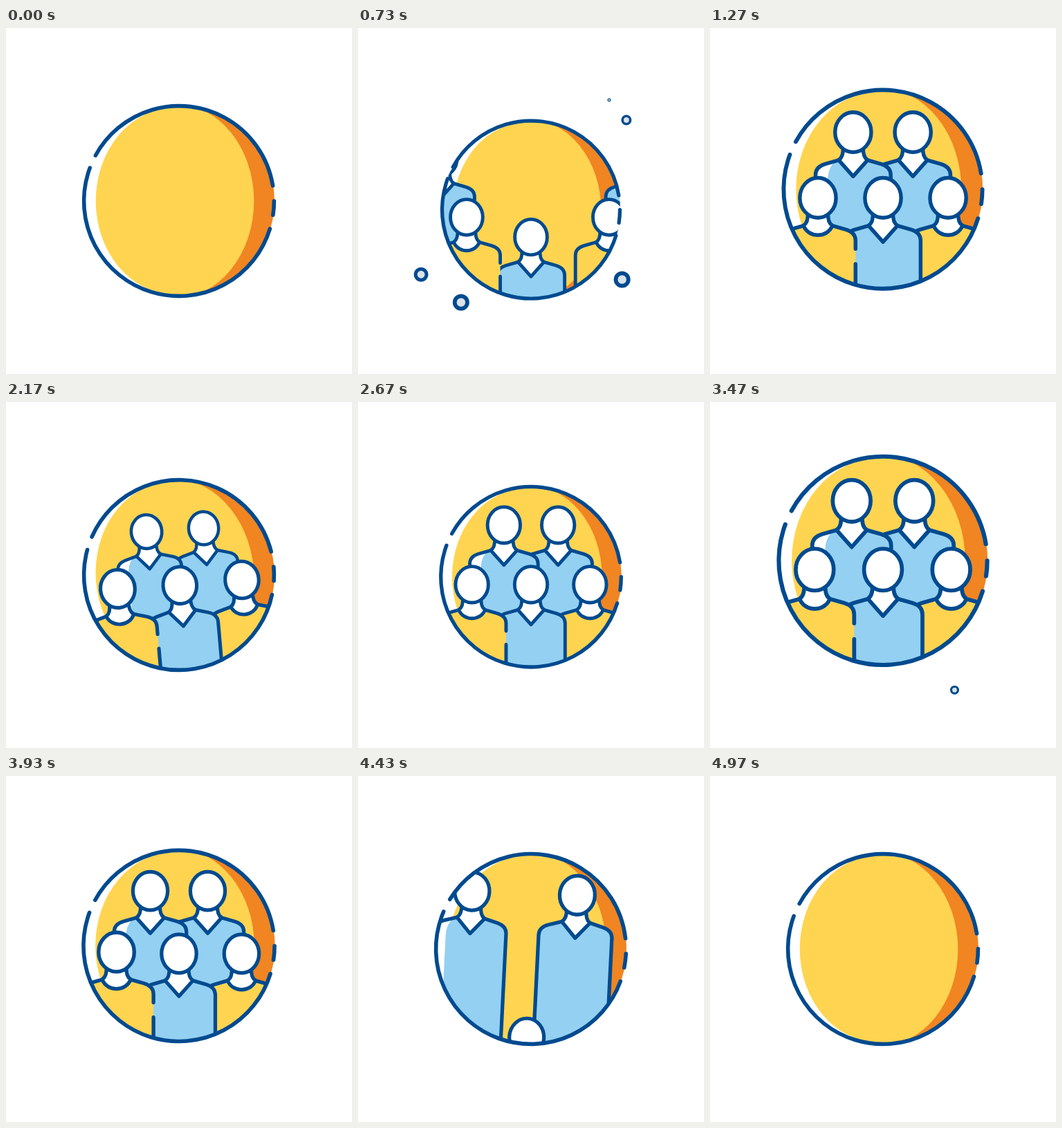
Recreate the animation shown at these times as an HTML page with a canvas. Size 500 by 500 pixels, loop 5.01 s.

```html
<!DOCTYPE html>
<html lang="en">
<head>
<meta charset="utf-8">
<title>Team</title>
<style>
html, body { margin: 0; width: 100%; height: 100%; overflow: hidden; background: #fff; }
canvas { display: block; width: 500px; height: 500px; }
</style>
</head>
<body>
<canvas id="stage" width="500" height="500"></canvas>
<script>
const ctx = document.getElementById('stage').getContext('2d');
const LOOP = 5010, FPS = 30, LAST = 149, HALF = 75, RAD = Math.PI / 180;
const NAVY = '#004a8f', YELLOW = '#ffd450', ORANGE = '#f08522', BLUE = '#93d0f2', PALE = '#dbe2ea';
const FOOT = 110;   // squash pivot below each head
const FAR = 157;    // entry distance

function ease(x) {
  x = Math.max(0, Math.min(1, x));
  return x * x * (3 - 2 * x);
}

// Eased run through equally spaced values
function run(f, start, step, values) {
  return values.reduce((v, next, i) =>
    i ? v + (next - values[i - 1]) * ease((f - start) / step - i + 1) : next, 0);
}

function person(side, back) {
  const blue = back || !side;
  return {
    x: side * (back ? 41.3 : 90),
    y: back ? -79 : 11.7,
    dx: side,
    dy: side ? 0 : 1,
    delay: (back ? 6.5 : 0) + (side < 0 ? 0 : 2),
    fill: blue ? BLUE : YELLOW,
    vee: blue,
    shine: back && side < 0,
    gap: !back && side < 0
  };
}

const people = [
  person(1, true), person(-1, true),
  person(1, false), person(0, false), person(-1, false)
];

// Resting points of the bubbles around the centre, in order of appearance
const bursts = [
  { start: 7.5, gap: 2, ends: [[113, -146], [139, -118], [-163, 109], [-107, 155], [145, 125]] },
  { start: 80, gap: 2.2, ends: [[-185, -57], [48, -171], [-109, 164], [187, -14], [-43, 178], [104, 167]] }
];

function paint(fill) {
  ctx.fillStyle = fill;
  ctx.fill();
  ctx.stroke();
}

function drawBubble(x, y, p) {
  if (p <= 0 || p >= 1) return;
  const k = 1 - 55 * (1 - p) ** 2 / Math.hypot(x, y);
  const r = 12.2 * Math.sin(Math.PI * p) ** .7;
  ctx.lineWidth = r * .48;
  ctx.beginPath();
  ctx.arc(250 + x * k, 250 + y * k, r * .76, 0, 7);
  paint(PALE);
}

function bodyPath(rightEnd) {
  ctx.beginPath();
  ctx.moveTo(-52, 320);
  ctx.lineTo(-52, 59);
  ctx.quadraticCurveTo(-52, 48, -39, 44);
  ctx.lineTo(-18, 38);
  ctx.lineTo(18, 38);
  ctx.lineTo(39, 44);
  ctx.quadraticCurveTo(52, 48, 52, 59);
  ctx.lineTo(52, rightEnd);
}

function drawBody(p) {
  bodyPath(320);
  ctx.fillStyle = p.shine ? '#fff' : p.fill;
  ctx.fill();
  if (p.shine) {
    ctx.save();
    ctx.clip();
    ctx.beginPath();
    ctx.moveTo(-20, 36);
    ctx.quadraticCurveTo(-35, 46, -35, 66);
    ctx.lineTo(-35, 320);
    ctx.lineTo(60, 320);
    ctx.lineTo(60, 36);
    ctx.fillStyle = p.fill;
    ctx.fill();
    ctx.restore();
  }
  bodyPath(p.gap ? 70.8 : 320);
  if (p.gap) {
    ctx.moveTo(52, 91.5);
    ctx.lineTo(52, 320);
  }
  ctx.stroke();
}

function drawCollar(vee) {
  ctx.beginPath();
  ctx.moveTo(-14, 20);
  ctx.quadraticCurveTo(-13, 34, -20, 38.5);
  if (vee) {
    ctx.lineTo(0, 61);
    ctx.lineTo(20, 38.5);
  } else {
    ctx.bezierCurveTo(-13, 56, 13, 56, 20, 38.5);
  }
  ctx.quadraticCurveTo(13, 34, 14, 20);
  paint('#fff');
}

function drawPerson(p, f) {
  const t = f - p.delay;
  const away = FAR * (1 - ease((t - 9.25) / 15) + ease((t - 121) / 15));
  const size = run(t, 46, 10, [1, .865, 1]) + run(t, 115, 6, [0, .05, 0]);
  ctx.save();
  ctx.translate(p.x + p.dx * away, p.y + p.dy * away + FOOT);
  ctx.scale(size, size);
  ctx.translate(0, -FOOT);
  drawBody(p);
  drawCollar(p.vee);
  ctx.beginPath();
  ctx.ellipse(0, 0, 25, 27.6, 0, 0, 7);
  paint('#fff');
  ctx.restore();
}

function drawBackdrop() {
  ctx.fillStyle = '#fff';
  ctx.fillRect(-140, -140, 140, 280);
  ctx.fillStyle = ORANGE;
  ctx.fillRect(0, -140, 140, 280);
  ctx.fillStyle = YELLOW;
  ctx.beginPath();
  ctx.ellipse(-6, 0, 114.3, 135, 0, 90 * RAD, 270 * RAD);
  ctx.ellipse(-6, 0, 114.3, 140.5, 0, -90 * RAD, 90 * RAD);
  ctx.fill();
}

function drawBadge(f) {
  const u = f % HALF;
  const size = run(u, 0, 15, [1, .8, 1.1, 1]);
  ctx.save();
  ctx.translate(250, run(u, 2, 15, [250, 276, 224, 250]));
  ctx.rotate(run(u, 45, 10, [0, 5, -5, 0]) * RAD);
  ctx.scale(size, size);

  ctx.save();
  ctx.beginPath();
  ctx.arc(0, 0, 138, 0, 7);
  ctx.clip();
  drawBackdrop();
  ctx.lineWidth = 5.2;
  for (const p of people) drawPerson(p, f);
  ctx.restore();

  ctx.lineWidth = 5.6;
  for (const [from, to] of [[17, 200.4], [208.6, 350.8], [0, 8.5]]) {
    ctx.beginPath();
    ctx.arc(0, 0, 137.4, from * RAD, to * RAD);
    ctx.stroke();
  }
  ctx.restore();
}

function draw(ms) {
  const f = Math.min(LAST, Math.floor((ms + 5) * FPS / 1000));
  ctx.fillStyle = '#fff';
  ctx.fillRect(0, 0, 500, 500);
  ctx.strokeStyle = NAVY;
  ctx.lineCap = ctx.lineJoin = 'round';
  for (const { start, gap, ends } of bursts) {
    ends.forEach(([x, y], i) => drawBubble(x, y, (f - start - gap * i) / 15));
  }
  drawBadge(f);
}

const began = performance.now();
function tick() {
  draw((performance.now() - began) % LOOP);
  requestAnimationFrame(tick);
}
tick();
</script>
</body>
</html>
```
